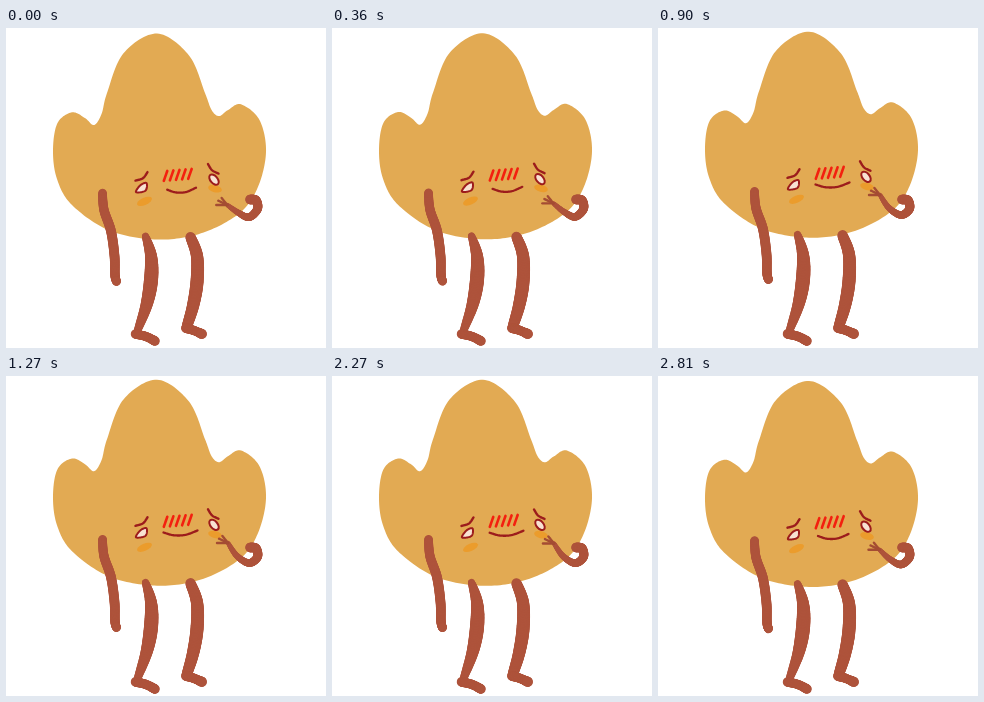
An HTML page with a canvas that plays this animation: 320 px wide and 320 px high, repeating every 2.99 s.

```html
<!DOCTYPE html>
<html lang="en">
<head>
<meta charset="utf-8">
<title>Shy blob</title>
<style>
  html, body { margin: 0; width: 100%; height: 100%; overflow: hidden; background: #fff; }
  canvas { display: block; width: 100vmin; height: 100vmin; }
</style>
</head>
<body>
<canvas id="stage" width="320" height="320"></canvas>
<script>
const ctx = document.getElementById('stage').getContext('2d');
const SKIN = '#e2aa53', LIMB = '#ae533b', FINGER = '#a44c33';
const INK = '#9c1c1c', RED = '#f3200f', CHEEK = '#eb9c2c', EYE = '#f8e2d2';
const LOOP = 2990, STEP = 180, RISE = 180, FALL = 2270;
const { PI, sin, cos, floor, min } = Math;

const BODY = [
  [151, 5.5], [183, 27.4], [199, 65], [205.6, 82], [213, 88], [222, 82], [235, 76.3],
  [253.5, 92], [260, 124], [251.5, 160], [233, 185.5], [195, 205.3], [151, 211.5],
  [103.5, 202.5], [66, 177], [51, 151], [47, 122], [51.5, 95], [66, 84.3],
  [79, 90], [88, 97], [95.5, 86], [101, 65], [117.5, 25.2]
];

const mix = (a, b, p) => a + (b - a) * p;
const blend = (a, b, p) => a.map((v, i) => mix(v, b[i], p));
const bulge = (ends, middle) => u => mix(ends, middle, sin(PI * u));

// Samples a Catmull-Rom curve through the points
function spline(pts, closed = false) {
  const n = pts.length, spans = closed ? n : n - 1, out = [];
  const at = i => closed ? pts[(i + n) % n] : pts[min(n - 1, i < 0 ? 0 : i)];
  for (let i = 0; i < spans; i++) {
    const [a, b, c, d] = [-1, 0, 1, 2].map(k => at(i + k));
    for (let t = 0; t < 1; t += 1 / 16) {
      out.push(b.map((v, k) => v + t / 2 * (c[k] - a[k] +
        t * (2 * a[k] - 5 * v + 4 * c[k] - d[k] + t * (3 * (v - c[k]) + d[k] - a[k])))));
    }
  }
  return closed ? out : [...out, pts[n - 1]];
}

function trace(pts) {
  ctx.beginPath();
  pts.forEach(pt => ctx.lineTo(...pt));
}

function line(pts, width, color) {
  trace(spline(pts));
  ctx.lineWidth = width;
  ctx.strokeStyle = color;
  ctx.stroke();
}

// A round brush stroke whose width depends on the way along it
function limb(pts, width) {
  const path = spline(pts);
  for (let i = 1; i < path.length; i++) {
    trace([path[i - 1], path[i]]);
    ctx.lineWidth = width(i / path.length);
    ctx.strokeStyle = LIMB;
    ctx.stroke();
  }
}

function oval(x, y, rx, ry, turn, color) {
  ctx.beginPath();
  ctx.ellipse(x, y, rx, ry, turn, 0, PI * 2);
  ctx.fillStyle = color;
  ctx.fill();
}

function drawBody() {
  trace(spline(BODY, true));
  ctx.fillStyle = SKIN;
  ctx.fill();
  limb([[96.5, 165], [98, 182], [105, 203], [108.5, 228], [109, 247], [110.5, 253.5]], bulge(8.5, 9.8));
}

// Feet stay put while the legs stretch
function drawLegs(p) {
  ctx.save();
  ctx.translate(0, 312);
  ctx.scale(1, 1 + (2.5 * p - 0.7) / 107);
  ctx.translate(0, -312);
  limb([[139.5, 208], [145, 228], [145, 252], [140.5, 277], [131, 304]], bulge(6.5, 14));
  limb([[129.5, 306], [140, 308.5], [149, 313]], bulge(9.5, 9));
  limb([[184.5, 209], [191, 228], [191, 254], [187, 278], [181, 298]], bulge(10, 13));
  limb([[180, 300], [188, 302.5], [196, 306]], bulge(10, 9));
  ctx.restore();
}

function drawEyes() {
  line([[129.5, 153], [137, 150.5], [141.5, 144.5]], 2.4, INK);
  line([[202, 136.5], [206, 142.5], [212.5, 146]], 2.4, INK);
  trace(spline([[130, 164.5], [134.5, 157.5], [140.5, 155.5], [139.5, 163]], true));
  ctx.fillStyle = EYE;
  ctx.fill();
  ctx.lineWidth = 2;
  ctx.stroke();
  oval(208, 152, 3.6, 6, -0.7, EYE);
  ctx.stroke();
}

function drawFace(p) {
  ctx.save();
  ctx.translate(0, mix(0.6, -2.2, p));
  oval(138.5, 173.5, 8, 3.6, -0.42, CHEEK);
  oval(209, 160.8, 7, 3.6, 0.25, CHEEK);
  for (let i = 0; i < 5; i++) {
    const x = 157.8 + i * 6.1, y = 153 - i * 0.5;
    line([[x, y], [x + 3.5, y - 10]], 2.6, RED);
  }
  ctx.translate(0, -p);
  drawEyes();
  ctx.restore();
  const drop = mix(162.5, 155.5, p), half = mix(13.5, 17, p);
  line([-1, -0.4, 0.3, 1].map(k => [mix(176, 174.5, p) + k * half, drop + 4 * (1 - k * k) - k]), 2.3, INK);
}

function drawRightArm(p) {
  const palm = blend([221, 180.5], [222, 167], p);
  const wrist = blend([233, 186.5], [231, 180], p);
  const elbow = blend([243, 190], [243, 187], p);
  limb([[244, 171.5], [250, 172.5], [251.5, 181], elbow, wrist, palm], u => mix(9.5, 4, u * u));
  for (let i = 0; i < 3; i++) {
    const turn = PI + i * 0.45, reach = 11 - i;
    line([palm, [palm[0] + reach * cos(turn), palm[1] + reach * sin(turn)]], 2.4, FINGER);
  }
}

function draw(p) {
  ctx.fillStyle = '#fff';
  ctx.fillRect(0, 0, 320, 320);
  ctx.lineCap = ctx.lineJoin = 'round';
  ctx.save();
  ctx.translate(0, 0.7 - 2.5 * p);
  drawBody();
  ctx.restore();
  drawLegs(p);
  drawFace(p);
  drawRightArm(p);
}

// Eased stretch upwards in 4 steps, a rest, then back down in 6
function stretch(t) {
  const time = t < RISE ? t + LOOP : t;
  if (time < FALL) return sin(PI / 2 * min(1, floor((time - RISE) / STEP) / 4));
  return cos(PI / 2 * (floor((time - FALL) / STEP) + 1) / 6);
}

const origin = performance.now();
function tick() {
  draw(stretch((performance.now() - origin) % LOOP));
  requestAnimationFrame(tick);
}
tick();
</script>
</body>
</html>
```
